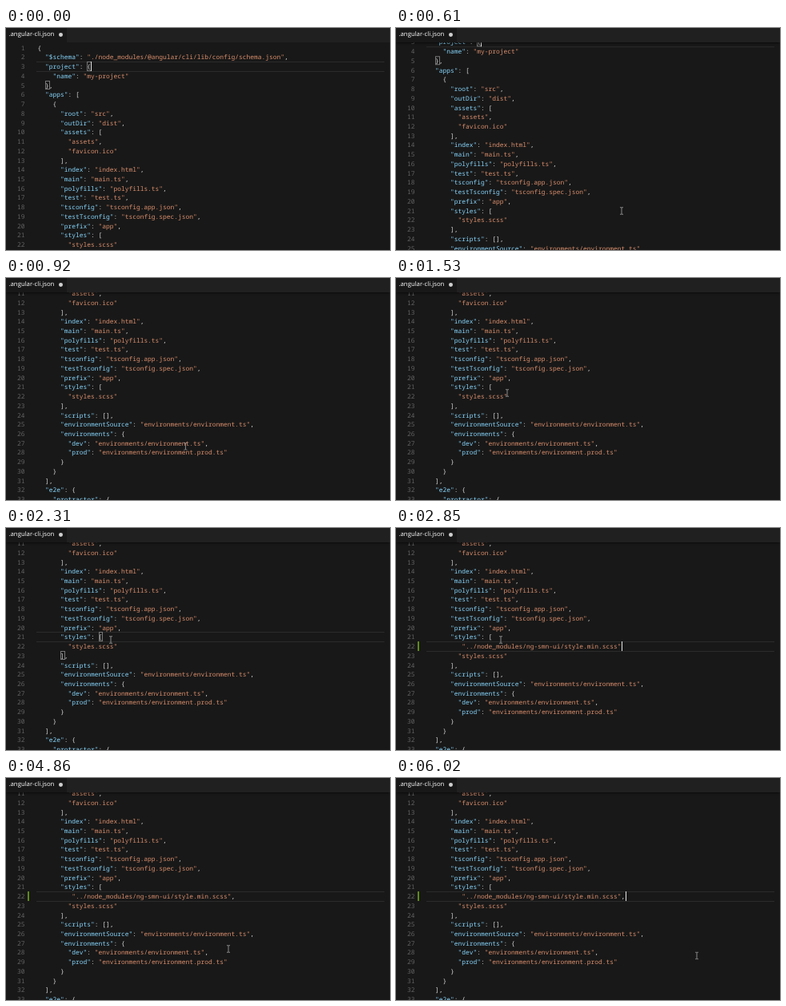
These frames come from a looping animation (480x278 px, 6.25 s). An HTML page:

```html
<!DOCTYPE html>
<html lang="en">
<head>
<meta charset="utf-8">
<title>Editing .angular-cli.json</title>
<style>
  html, body { margin: 0; width: 100%; height: 100%; overflow: hidden; background: #181818; }
  #stage { position: relative; width: 480px; height: 278px; overflow: hidden; text-rendering: geometricPrecision; }
  #stage div, #stage i, #stage svg { position: absolute; }
  #view { left: 0; top: 18px; width: 480px; height: 260px; overflow: hidden; }
  #doc { left: 0; top: .6px; width: 480px; height: 420px; }
  #lines { left: 0; top: 0; font: 500 7.917px "Noto Sans Mono", "DejaVu Sans Mono", monospace; fill: #d4d4d4; }
  .num { fill: #626262; font-weight: 400; text-anchor: end; }
  .key { fill: #86d4fa; }
  .str { fill: #d98e6c; }
  #active { left: 38px; width: 435px; height: 11px; border: solid #2b2b2b; border-width: 1px 0; }
  .pair { width: 5.5px; height: 11.5px; border: 1px solid #777; box-sizing: border-box; }
  #caret { width: 1.3px; height: 11.7px; background: #e4e4e4; }
  #added { left: 27px; width: 1.7px; height: 11.73px; background: #5d8a1c; }
  #error { width: 62px; border-bottom: 1px dotted #c83c3c; }
  #bar { left: 0; top: 0; width: 480px; height: 18px; background: #202021; }
  #tab { left: 0; top: 0; width: 76px; height: 18px; background: #181818; font: 7.75px/17px "Open Sans", "Noto Sans", sans-serif; color: #fff; text-indent: 3.5px; }
  #dot { left: 66px; top: 6.2px; width: 4.8px; height: 4.8px; border-radius: 50%; background: #d0d0d0; }
  #mouse { left: -3px; top: -5px; fill: none; stroke: #a8a8a8; stroke-width: .8; }
</style>
</head>
<body>
<div id="stage">
  <div id="view">
    <div id="doc">
      <div id="active"></div>
      <svg id="lines" width="480" height="420"></svg>
      <i class="pair"></i><i class="pair"></i>
      <i id="caret"></i><i id="added"></i><i id="error"></i>
    </div>
  </div>
  <div id="bar"><div id="tab">.angular-cli.json<i id="dot"></i></div></div>
  <svg id="mouse" width="6" height="10"><path d="M1 .7H2.4L3 1.2 3.6 .7H5M3 1V9M1 9.3H2.4L3 8.8 3.6 9.3H5"/></svg>
</div>
<script>
const LOOP = 6250, ROW = 11.73, COL = 4.75, LEFT = 39.5, BASE = 8.75;
const CLICK = 1840, ENTER = 2380, PASTE = 2770, COMMA = 4080;
const file = `{
  "$schema": "./node_modules/@angular/cli/lib/config/schema.json",
  "project": {
    "name": "my-project"
  },
  "apps": [
    {
      "root": "src",
      "outDir": "dist",
      "assets": [
        "assets",
        "favicon.ico"
      ],
      "index": "index.html",
      "main": "main.ts",
      "polyfills": "polyfills.ts",
      "test": "test.ts",
      "tsconfig": "tsconfig.app.json",
      "testTsconfig": "tsconfig.spec.json",
      "prefix": "app",
      "styles": [
        "styles.scss"
      ],
      "scripts": [],
      "environmentSource": "environments/environment.ts",
      "environments": {
        "dev": "environments/environment.ts",
        "prod": "environments/environment.prod.ts"
      }
    }
  ],
  "e2e": {
    "protractor": {
      "config": "./protractor.conf.js"`.split("\n");
const added = ' '.repeat(9) + '"../node_modules/ng-smn-ui/style.min.scss"';

// Mouse path: time, x, y
const path = [
  [150, 302, 237], [610, 282, 229], [690, 282, 229], [780, 239, 221], [840, 239, 221],
  [1390, 140, 152], [1530, 139, 144], [1610, 139, 144], [1760, 131, 140], [4400, 131, 140],
  [4860, 278, 214], [4950, 278, 214], [5100, 354, 214], [5400, 366, 237], [5640, 375, 223], [5790, 376, 222.5]
];
const wheel = [530, 690, 780, 840];
const caretOff = [[2310, ENTER], [3230, 3780], [4560, 5080], [5540, 6020]];

const $ = id => document.getElementById(id);
const pairs = document.querySelectorAll(".pair");
const show = (el, on) => el.style.visibility = on ? "visible" : "hidden";
const place = (el, line, col) => {
  el.style.top = (line - 1) * ROW + "px";
  if (col !== undefined) el.style.left = LEFT + col * COL + "px";
};
const paint = s => s.replace(/"[^"]*"(?=(:?))/g,
  (m, colon) => `<tspan class="${colon ? "key" : "str"}">${m}</tspan>`);

function mouseAt(t) {
  const i = path.findIndex(p => p[0] > t);
  if (i < 1) return i ? path[path.length - 1] : path[0];
  const a = path[i - 1], b = path[i], k = (t - a[0]) / (b[0] - a[0]);
  return a.map((v, j) => v + (b[j] - v) * k);
}

let shown;
function setLines(extra) {
  if (shown === extra) return;
  shown = extra;
  const rows = file.slice();
  if (extra !== null) rows.splice(21, 0, extra);
  $("lines").innerHTML = rows.map((s, i) => {
    const code = s.trimStart(), x = LEFT + (s.length - code.length) * COL;
    const y = (i * ROW + BASE).toFixed(2);
    return `<text class="num" x="23.5" y="${y}">${i + 1}</text><text x="${x}" y="${y}">${paint(code)}</text>`;
  }).join("");
}

function render(t) {
  setLines(t < ENTER ? null : t < PASTE ? "" : t < COMMA ? added : added + ",");

  const scroll = wheel.filter(w => t >= w).length * 30.75;
  $("doc").style.transform = `translateY(${-scroll}px)`;
  $("bar").style.boxShadow = scroll ? "0 0 3px #000" : "none";

  const [line, col] = t < CLICK ? [3, 14] : t < ENTER ? [21, 17]
    : [22, t < PASTE ? 8 : t < COMMA ? 51 : 52];
  place($("caret"), line, col);
  show($("caret"), !caretOff.some(([a, b]) => t >= a && t < b));
  place($("active"), line);

  const ends = t < CLICK ? [[3, 13], [5, 2]] : [[21, 16], [23, 6]];
  pairs.forEach((el, i) => {
    place(el, ...ends[i]);
    show(el, t < ENTER);
  });

  place($("added"), 22);
  show($("added"), t >= 2620);
  place($("error"), 23.9, 8);
  show($("error"), t >= 3310 && t < 4480);

  const [, x, y] = mouseAt(t);
  $("mouse").style.transform = `translate(${x}px, ${y}px)`;
  show($("mouse"), t >= 150);
}

const start = performance.now();
function tick() {
  render((performance.now() - start) % LOOP);
  requestAnimationFrame(tick);
}
tick();
</script>
</body>
</html>
```
